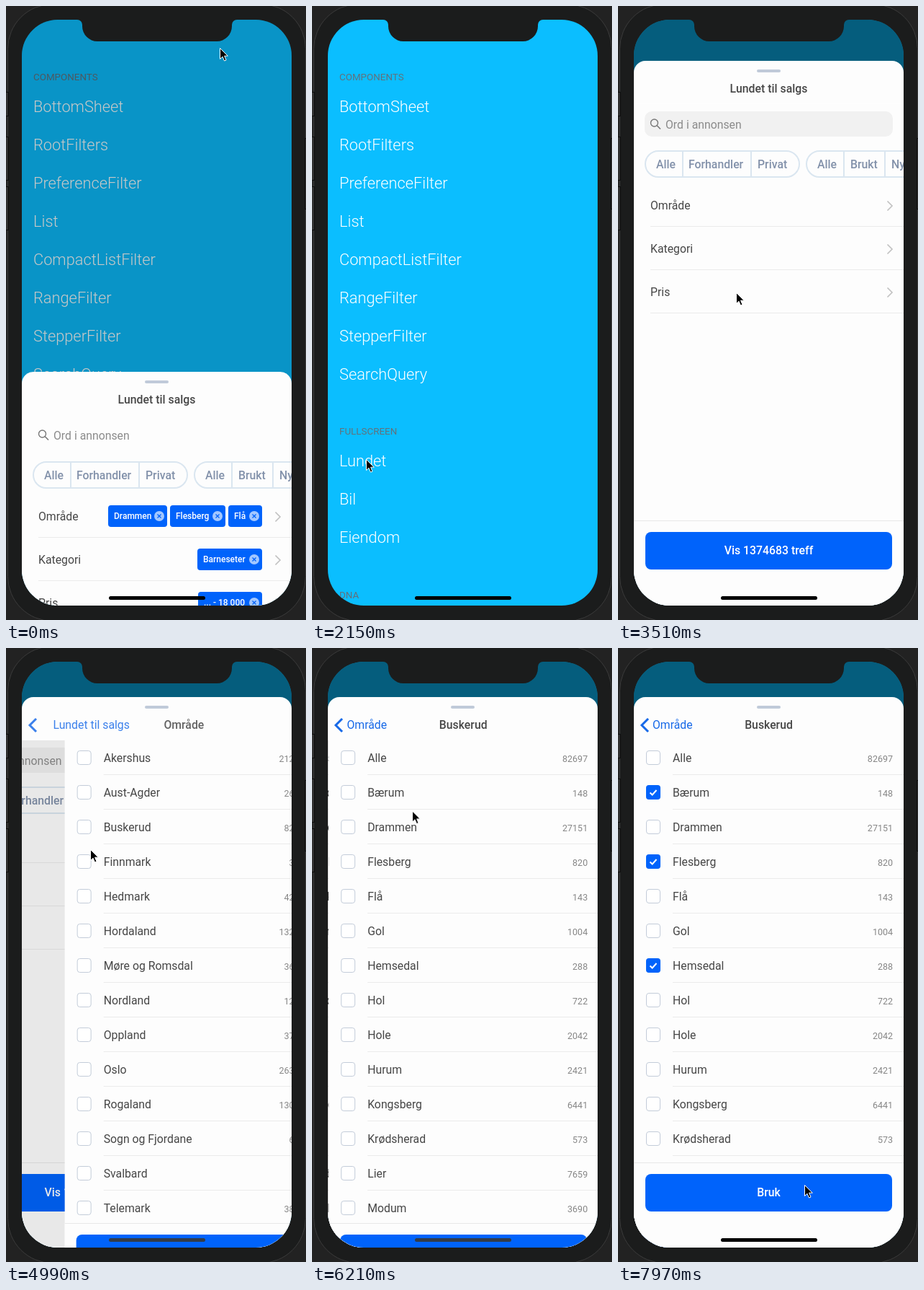
These frames come from a looping animation (417x851 px, 8000 ms). An HTML page:

```html
<!DOCTYPE html>
<html lang="no">
<head>
<meta charset="utf-8">
<title>Bottom sheet filter</title>
<style>
@property --y { syntax: "<number>"; inherits: true; initial-value: 831; }
@property --h { syntax: "<number>"; inherits: true; initial-value: 763; }
@property --dim { syntax: "<number>"; inherits: true; initial-value: 0; }
@property --a { syntax: "<number>"; inherits: true; initial-value: 0; }
@property --b { syntax: "<number>"; inherits: true; initial-value: 0; }
@property --foot { syntax: "<number>"; inherits: true; initial-value: 0; }
@property --checks { syntax: "<number>"; inherits: true; initial-value: 0; }
@property --fresh { syntax: "<number>"; inherits: true; initial-value: 0; }

html, body { margin: 0; width: 100%; height: 100%; overflow: hidden; background: #1b1c1c; }
#stage {
  position: relative; width: 417px; height: 851px; overflow: hidden;
  font: 400 15.8px/20px Roboto, sans-serif; color: #464646; white-space: nowrap;
  animation: 8s linear infinite;
  animation-name: y, h, dim, a, b, foot, checks, fresh;
}
#stage div, #stage span, #stage svg { position: absolute; box-sizing: border-box; }
#stage span { margin-top: -9px; }
.mid { left: 0; width: 100%; text-align: center; }
.bold { font-weight: 500; }

#screen { left: 22px; top: 19px; width: 375px; height: 812px; border-radius: 50px; overflow: hidden; background: #0bbeff; }
#view { left: 0; top: -19px; width: 375px; height: 851px; }
.item { font-weight: 300; font-size: 21.8px; color: #fff; }
.head { font-size: 13.4px; color: #62717c; }
#dim { inset: 0; background: #000; opacity: var(--dim); }

#sheet {
  left: 0; width: 375px; top: calc(var(--y) * 1px); height: calc(var(--h) * 1px);
  background: #fdfdfd; border-radius: 16px 16px 20px 20px; overflow: hidden;
}
#pages { inset: 0; clip-path: inset(60px 0 0 0); }
.page { inset: 0; background: #fdfdfd; }
.shade { inset: 0; background: #000; }
#root { transform: translateX(calc(var(--a) * -112px)); }
#root .shade { opacity: calc(var(--a) * .1); }
#area { transform: translateX(calc((1 - var(--a)) * 375px - var(--b) * 112px)); }
#area .shade { opacity: calc(var(--b) * .1); }
#town { transform: translateX(calc((1 - var(--b)) * 375px)); }

.handle { left: 171px; top: 12px; width: 33px; height: 4px; border-radius: 2px; background: #c0cad9; }
.search { left: 15px; top: 70px; width: 345px; height: 35px; border-radius: 10px; background: #f1f1f1; opacity: var(--fresh); }
.hint { color: #8b8b8b; }
.pill { top: 124px; height: 38px; border: 2px solid #dae6f0; border-radius: 19px; }
.split { top: 124px; width: 2px; height: 38px; background: #dae6f0; }
.tab { color: #8291aa; font-weight: 500; }
.line { right: 0; height: 1px; background: #ebebeb; }
.count { right: 15px; font-size: 12.5px; color: #868686; }
#area .count { right: 35px; }
.box { left: 17px; width: 20px; height: 20px; border: 1px solid #c3ccd9; border-radius: 4px; background: #fff; }
.tick { left: 17px; width: 20px; height: 20px; border-radius: 4px; background: #0063fb; }
.foot { left: 0; width: 100%; height: 118px; background: #fdfdfd; border-top: 1px solid #e8e8e8; }
.foot div { left: 16px; top: 15px; width: 343px; height: 52px; border-radius: 8px; background: #0063fb; color: #fff; font-weight: 500; line-height: 52px; text-align: center; }
#root .foot { bottom: 0; }
#area .foot { top: 729px; }
#town .foot { top: calc(729px - var(--foot) * 84px); }
#chips { inset: 0; opacity: calc(1 - var(--fresh)); }
.chip { height: 30px; border-radius: 4px; background: #0063fb; color: #fff; font: 500 12px/30px Roboto, sans-serif; padding-left: 8px; }

.back { left: 26px; color: #1769e8; }
#title0 { transform: translateX(calc(var(--a) * -110px)); opacity: calc(1 - 1.3 * var(--a)); }
#back1 { transform: translateX(calc((1 - var(--a)) * 110px - var(--b) * 100px)); opacity: calc(var(--a) * (1 - 1.2 * var(--b))); }
#title1 { transform: translateX(calc((1 - var(--a)) * 238px - var(--b) * 133px)); opacity: calc(var(--a) * (1 - 1.3 * var(--b))); }
#back2 { transform: translateX(calc((1 - var(--b)) * 133px)); opacity: var(--b); }
#title2 { transform: translateX(calc((1 - var(--b)) * 238px)); opacity: var(--b); }
#arrow { left: 8px; top: 27px; opacity: var(--a); }

#home { left: 143px; top: 818px; width: 134px; height: 5px; border-radius: 3px; background: #000; animation: home 8s step-end infinite; }
#cursor { left: 0; top: 0; overflow: visible; animation: cursor 8s linear infinite; }

@keyframes y {
  0%, .7% { --y: 507; animation-timing-function: cubic-bezier(.25, .5, .5, 1); }
  4.5%, 28.6% { --y: 831; animation-timing-function: cubic-bezier(.3, .45, .5, 1); }
  31.5% { --y: 315; animation-timing-function: ease-in-out; }
  34.1%, 39.75% { --y: 328; animation-timing-function: ease-in; }
  42.875% { --y: 100; }
  43.875% { --y: 76; animation-timing-function: ease-out; }
  45.25% { --y: 65; animation-timing-function: ease-in-out; }
  47.375%, 100% { --y: 68; }
}
@keyframes h {
  0%, 12.5% { --h: 763; }
  12.51%, 39.75% { --h: 503; animation-timing-function: ease-in; }
  42.875% { --h: 731; }
  43.875% { --h: 755; animation-timing-function: ease-out; }
  45.25% { --h: 766; animation-timing-function: ease-in-out; }
  47.375%, 100% { --h: 763; }
}
@keyframes dim {
  0%, .7% { --dim: .22; animation-timing-function: ease-out; }
  4.5%, 28.6% { --dim: 0; animation-timing-function: ease-out; }
  31.5%, 100% { --dim: .51; }
}
@keyframes a {
  0%, 60.125% { --a: 0; animation-timing-function: cubic-bezier(.3, .3, .6, 1); }
  62.375% { --a: .84; animation-timing-function: ease-out; }
  66%, 100% { --a: 1; }
}
@keyframes b {
  0%, 72.375% { --b: 0; animation-timing-function: cubic-bezier(.3, .3, .6, 1); }
  74.625% { --b: .84; animation-timing-function: ease-out; }
  78%, 100% { --b: 1; }
}
@keyframes foot {
  0%, 83.5% { --foot: 0; animation-timing-function: ease-out; }
  86.6%, 100% { --foot: 1; }
}
@keyframes checks {
  0% { --checks: 0; animation-timing-function: step-end; }
  83.25% { --checks: 1; animation-timing-function: step-end; }
  88.1% { --checks: 2; animation-timing-function: step-end; }
  93.5%, 100% { --checks: 3; }
}
@keyframes fresh {
  0%, 12.5% { --fresh: 0; }
  12.51%, 100% { --fresh: 1; }
}
@keyframes home {
  0% { background: #000; }
  61.1% { background: #333b48; }
  83.75%, 100% { background: #000; }
}
@keyframes cursor {
  0%, 1.5% { transform: translate(297px, 58px); animation-timing-function: ease-in; }
  6% { transform: translate(257px, 460px); }
  7.75% { transform: translate(265px, 610px); animation-timing-function: ease-out; }
  9.875% { transform: translate(269px, 760px); }
  10.6% { transform: translate(252px, 750px); animation-timing-function: ease-in-out; }
  17.1%, 26.8% { transform: translate(75px, 629px); }
  26.9%, 37.8% { transform: translate(75px, 628px); animation-timing-function: ease-in-out; }
  39.75% { transform: translate(155px, 642px); animation-timing-function: ease-in; }
  42.875%, 48.5% { transform: translate(164px, 397px); animation-timing-function: ease-in-out; }
  57.6%, 65% { transform: translate(117px, 279px); animation-timing-function: ease-in-out; }
  68.9%, 72.4% { transform: translate(133px, 246px); animation-timing-function: ease-in-out; }
  77.6% { transform: translate(139px, 226px); }
  80.1%, 83.5% { transform: translate(142px, 198px); animation-timing-function: ease-in-out; }
  86.9%, 88.3% { transform: translate(148px, 292px); animation-timing-function: ease-in-out; }
  90.9%, 93.8% { transform: translate(150px, 436px); animation-timing-function: ease-in-out; }
  99%, 100% { transform: translate(259px, 744px); }
}
</style>
</head>
<body>
<div id="stage">
  <svg width="417" height="851">
    <rect width="417" height="851" fill="#222"/>
    <rect x="2.5" y="-2.5" width="414" height="855" rx="62" fill="#1b1c1c" stroke="#3b3b3b"/>
    <g fill="#303030" stroke="#0c0c0c">
      <path d="M-1 119.5H3.5V152.5H-1ZM-1 181.5H3.5V241.5H-1ZM-1 250.5H3.5V310.5H-1ZM418 183.5H415.5V281.5H418Z"/>
    </g>
  </svg>
  <div id="screen"><div id="view">
    <div id="list"></div>
    <div id="dim"></div>
    <div id="sheet">
      <div id="pages">
        <div class="page" id="root"></div>
        <div class="page" id="area"></div>
        <div class="page" id="town"></div>
      </div>
      <div class="handle"></div>
      <svg id="arrow" width="16" height="24"><path d="M12 3L3 12L12 21" fill="none" stroke="#1769e8" stroke-width="3"/></svg>
      <span class="mid bold" id="title0" style="top:38px">Lundet til salgs</span>
      <span class="back" id="back1" style="top:38px">Lundet til salgs</span>
      <span class="mid bold" id="title1" style="top:38px">Område</span>
      <span class="back" id="back2" style="top:38px">Område</span>
      <span class="mid bold" id="title2" style="top:38px">Buskerud</span>
    </div>
  </div></div>
  <svg width="417" height="60"><path d="M99 18V19A7 7 0 0 1 106 26V28A21 21 0 0 0 127 49H293A21 21 0 0 0 314 28V26A7 7 0 0 1 321 19V18Z" fill="#1b1c1c"/></svg>
  <div id="home"></div>
  <svg id="cursor" width="13" height="20"><path d="M.5.5V15.500L4 12.200L6.500 18L9 17L6.600 11.200H11.300Z" fill="#000" stroke="#fff"/></svg>
</div>
<script>
const $ = id => document.getElementById(id);
const text = (s, x, y, cls = "") => `<span class="${cls}" style="left:${x}px;top:${y}px">${s}</span>`;
const line = (x, y) => `<div class="line" style="left:${x}px;top:${y}px"></div>`;
const chevron = y => `<svg style="left:350px;top:${y - 8}px" width="12" height="16"><path d="M2.500 1.500L9 8L2.500 14.500" fill="none" stroke="#c2c2c2" stroke-width="1.700"/></svg>`;
const foot = label => `<div class="foot"><div>${label}</div></div>`;
const shade = `<div class="shade"></div>`;

// Background menu
const section = (head, y, items) => text(head, 16, y, "head") +
  items.map((s, i) => text(s, 16, y + 41 + 53 * i, "item")).join("");
$("list").innerHTML =
  section("COMPONENTS", 98, ["BottomSheet", "RootFilters", "PreferenceFilter", "List", "CompactListFilter", "RangeFilter", "StepperFilter", "SearchQuery"]) +
  section("FULLSCREEN", 589, ["Lundet", "Bil", "Eiendom"]) +
  section("DNA", 816, []);

// Root filter page
const pill = (x, w, splits) => `<div class="pill" style="left:${x}px;width:${w}px"></div>` +
  splits.map(s => `<div class="split" style="left:${s}px"></div>`).join("");
const chip = (s, x, w, y) => `<div class="chip" style="left:${x}px;top:${y - 15}px;width:${w}px">${s}
  <svg style="right:4px;top:8px" width="14" height="14"><circle cx="7" cy="7" r="7" fill="#a3c7ff"/><path d="M4.500 4.500L9.500 9.500M9.500 4.500L4.500 9.500" stroke="#0063fb" stroke-width="1.300"/></svg></div>`;
const tabs = [["Alle", 31], ["Forhandler", 76], ["Privat", 172], ["Alle", 255], ["Brukt", 301], ["Nye", 358]];
$("root").innerHTML =
  `<div class="search"></div>
  <svg style="left:22px;top:79px" width="18" height="18"><circle cx="6.500" cy="7" r="5" fill="none" stroke="#777" stroke-width="1.400"/><path d="M10 10.500L15 15.500" stroke="#777" stroke-width="1.600"/></svg>` +
  text("Ord i annonsen", 44, 88, "hint") +
  pill(15, 216, [67, 162]) + pill(239, 190, [291, 348]) +
  tabs.map(([s, x]) => text(s, x, 143, "tab")).join("") +
  ["Område", "Kategori", "Pris"].map((s, i) => {
    const y = 200 + 60 * i;
    return text(s, 23, y) + chevron(y + 1) + line(23, y + 29);
  }).join("") +
  `<div id="chips">` +
  chip("Drammen", 120, 82, 200) + chip("Flesberg", 206, 77, 200) + chip("Flå", 287, 47, 200) +
  chip("Barneseter", 244, 90, 260) + chip("... - 18 000", 245, 89, 320) + `</div>` +
  foot("Vis 1374683 treff") + shade;

// Checkbox lists
const checked = ["Bærum", "Flesberg", "Hemsedal"];
const tick = (i, y) => `<div class="tick" style="top:${y - 10}px;opacity:calc(var(--checks) - ${i})"><svg width="20" height="20"><path d="M5.500 10.500L8.700 13.500L14.500 7" fill="none" stroke="#fff" stroke-width="2"/></svg></div>`;
const rows = (data, more) => data.split(",").map((entry, i) => {
  const [name, count] = entry.split(":"), y = 84 + 48 * i, n = checked.indexOf(name);
  return `<div class="box" style="top:${y - 10}px"></div>` + (n < 0 ? "" : tick(n, y)) +
    text(name, 54, y) + `<span class="count" style="top:${y + 1}px">${count}</span>` +
    (more ? chevron(y) : "") + line(54, y + 23);
}).join("");
$("area").innerHTML = rows("Akershus:212480,Aust-Agder:26314,Buskerud:82697,Finnmark:3942,Hedmark:42518,Hordaland:132067,Møre og Romsdal:36825,Nordland:12940,Oppland:37416,Oslo:263751,Rogaland:130284,Sogn og Fjordane:6873,Svalbard:42,Telemark:38190", true) + foot("Bruk") + shade;
$("town").innerHTML = rows("Alle:82697,Bærum:148,Drammen:27151,Flesberg:820,Flå:143,Gol:1004,Hemsedal:288,Hol:722,Hole:2042,Hurum:2421,Kongsberg:6441,Krødsherad:573,Lier:7659,Modum:3690") + foot("Bruk");
</script>
</body>
</html>
```
